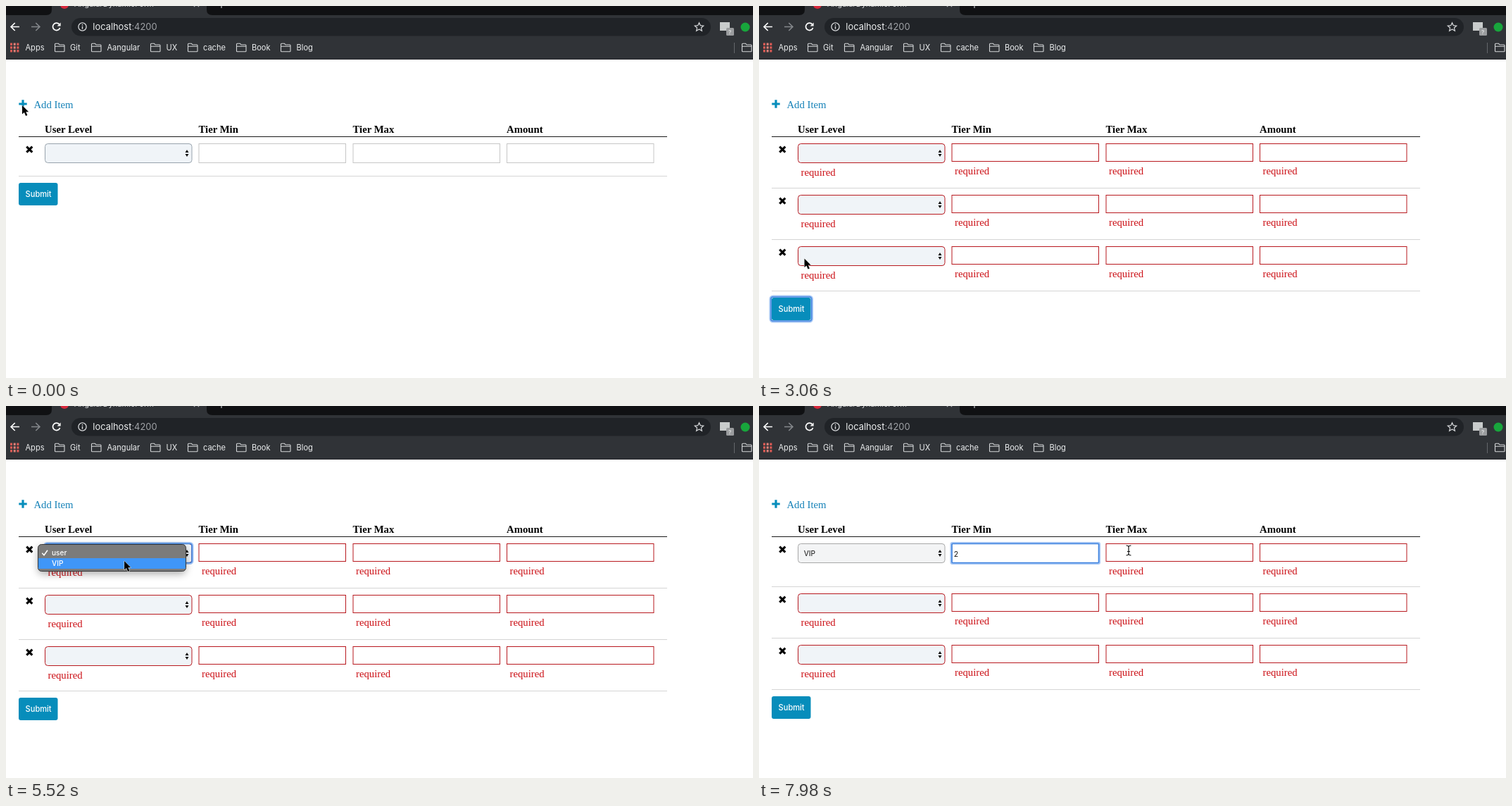
An HTML page for the animation above (8000 ms loop, 1061 px wide and 528 px high).

```html
<!DOCTYPE html>
<html lang="en">
<head>
<meta charset="utf-8">
<title>Dynamic form</title>
<style>
  html, body { margin: 0; width: 100%; height: 100%; overflow: hidden; background: #fff; }
  svg { display: block; width: 1061px; height: 528px; }
  text { white-space: pre; }
  .ui { font-family: Inter, "Liberation Sans", sans-serif; }
  .serif { font-family: "Liberation Serif", "Times New Roman", serif; font-size: 14.75px; }
  .bold { font-weight: 700; }
</style>
</head>
<body>
<svg viewBox="0 0 1061 528">
  <g id="browser"></g>
  <g id="page"></g>
  <g id="cursor"></g>
</svg>
<script>
const LOOP = 8000, STEP = 60;
const COLUMNS = [55, 273.5, 492.5, 711];
const LABELS = ['User Level', 'Tier Min', 'Tier Max', 'Amount'];
const FIELD_W = 209.5;
const TABLE_TOP = 185.5;
const RED = '#b8191f', BLUE = '#078dbb';

// Moments at which the form changes
const AT = {
  secondRow: 1260, thirdRow: 1920, press: 2700, submit: 2760,
  menu: 4320, hoverVip: 4980, choose: 5640, focusMin: 6060, type: 6900
};

// Pointer stops: time, x, y
const POINTER = [
  [0, 23, 141], [900, 24, 140], [2280, 25, 139], [2520, 44, 383], [2880, 45, 384],
  [3600, 170, 221], [4080, 172, 215], [4320, 175, 210], [4800, 175, 210],
  [5040, 170, 220], [5580, 168, 220], [5700, 277, 217], [5940, 345, 209],
  [7320, 345, 209], [7860, 525, 205], [8000, 525, 205]
];

const byId = id => document.getElementById(id);

function text(x, y, content, fill, cls, size, extra = '') {
  const fontSize = size ? `font-size="${size}"` : '';
  return `<text x="${x}" y="${y}" fill="${fill}" class="${cls}" ${fontSize} ${extra}>${content}</text>`;
}

function rect(x, y, w, h, fill, extra = '') {
  return `<rect x="${x}" y="${y}" width="${w}" height="${h}" fill="${fill}" ${extra}/>`;
}

function path(d, stroke, width, extra = '') {
  return `<path d="${d}" fill="none" stroke="${stroke}" stroke-width="${width}" ${extra}/>`;
}

function folder(x) {
  return path(`M${x + .5} 64V54.3q0-1 1-1h4l1.5 1.7h6q1 0 1 1V64q0 .8-.8 .8H${x + 1.3}q-.8 0-.8-.8zM${x + .5} 57.3h13.5`, '#d4d6d8', 1.1);
}

function browser() {
  const folders = [[69, 91, 'Git'], [121, 143.5, 'Aangular'], [205, 227.5, 'UX'],
    [258, 280, 'cache'], [327, 349, 'Book'], [390, 412.5, 'Blog']];
  let out = rect(0, 0, 1061, 76, '#303337') + rect(0, 0, 1061, 13, '#101113')
    + '<path d="M57 13q8 0 8-8V0H285V5q0 8 8 8z" fill="#303337"/>'
    + '<circle cx="83" cy="-2" r="6" fill="#d8283c"/>'
    + text(97, 1, 'AngularDynamicForm', '#dfe1e3', 'ui', 11.05)
    + path('M267-6l7 7M274-6l-7 7M306-6V3', '#aeb1b5', 1.3)
    + rect(93, 17, 908, 25.5, '#202327', 'rx="12.75"')
    + path('M19 29.5H7.5M12.7 24l-5.6 5.5 5.6 5.5', '#fff', 1.7)
    + path('M36 29.5H47.5M42.3 24l5.6 5.5-5.6 5.5', '#85888c', 1.6)
    + path('M75.7 26A5.2 5.2 0 1 0 76.6 31', '#fff', 1.7)
    + '<path d="M77.6 23.5v5h-5z" fill="#fff"/>'
    + '<circle cx="108.5" cy="29.5" r="5.6" fill="none" stroke="#d9dbdd" stroke-width="1.3"/>'
    + path('M108.5 28.7v4M108.5 26v1.5', '#d9dbdd', 1.4)
    + `<text x="123.3" y="34" class="ui" font-size="12.9" fill="#eceeef">localhost<tspan fill="#a0a3a7">:4200</tspan></text>`
    + path('M984.5 23.7l1.8 4 4.4.4-3.3 2.9 1 4.3-3.9-2.3-3.9 2.3 1-4.3-3.3-2.9 4.4-.4z', '#d4d6d8', 1.2)
    + rect(1014, 23, 14, 12, '#c9cccc')
    + rect(1023, 31, 11, 11, '#9a9c9e', 'rx="1.5"')
    + text(1026, 40, '?', '#fff', 'ui', 8)
    + '<circle cx="1050" cy="30" r="6.5" fill="#18a53c"/>';
  for (let i = 0; i < 9; i++)
    out += rect(6 + i % 3 * 4.7, 52.5 + Math.floor(i / 3) * 4.8, 3, 3.4, i % 3 === 1 ? '#df8078' : '#dc5b55');
  out += text(27.5, 63, 'Apps', '#eceeef', 'ui', 11.05);
  for (const [x, labelX, name] of folders)
    out += folder(x) + text(labelX, 63, name, '#eceeef', 'ui', 11.05);
  return out + path('M1034.5 52V67', '#64676b', 1) + folder(1045) + path('M0 75.5H1061', '#222428', 1);
}

function ring(x, y, w, h, radius = 3) {
  return rect(x - 1.2, y - 1.2, w + 2.4, h + 2.4, 'none', `rx="${radius + 1}" stroke="#a4c5f4" stroke-width="2.6"`)
    + rect(x, y, w, h, 'none', `rx="${radius}" stroke="#3f83df" stroke-width="1.6"`);
}

function selectBox(y, { value, invalid, focused }) {
  const x = COLUMNS[0] + .5, w = FIELD_W - 1, h = 27;
  const border = invalid ? RED : value ? '#a8a8a8' : '#98a3ad';
  return rect(x, y, w, h, value ? '#f3f4f5' : '#f0f4f8', `rx="4" stroke="${border}"`)
    + (focused ? ring(x, y, w, h, 3) : '')
    + `<path d="M254.5 ${y + 12.6}h5l-2.5-4zM254.5 ${y + 14.6}h5l-2.5 4z" fill="#111"/>`
    + (value ? text(63.7, y + 17.2, value, '#111', 'ui', 10.2) : '');
}

function inputBox(column, y, { value, invalid, focused, caret }) {
  const x = COLUMNS[column] + .5, w = FIELD_W - 1, h = invalid ? 25 : 27;
  return rect(x, y, w, h, '#fff', `stroke="${invalid ? RED : '#c6c6c6'}"`)
    + (focused ? ring(x, y, w, h, 1) : '')
    + (value ? text(x + 2.7, y + 18.4, value, '#111', 'ui', 10.4) : '')
    + (caret ? rect(x + (value ? 10 : 3.5), y + 7.5, 1, 13, '#111') : '');
}

function menu(hovered) {
  const item = (y, name) => text(65, y, name, '#fff', 'ui', 10.1, 'font-weight="500"');
  return '<rect x="46" y="200" width="209" height="38" rx="5" fill="#000" opacity=".35" style="filter:blur(6px)"/>'
    + rect(45.5, 196.5, 210, 38, '#7b7b7b', 'rx="5" stroke="#383838"')
    + rect(46, hovered ? 216 : 201, 209, 15, '#3f96f8')
    + path('M51.3 208.7l2.7 3 5-7', '#fff', 1.5)
    + item(212.3, 'user') + item(227, 'VIP');
}

function page(t) {
  const submitted = t >= AT.submit, chosen = t >= AT.choose, typed = t >= AT.type;
  const rowCount = 1 + (t >= AT.secondRow) + (t >= AT.thirdRow);
  const menuOpen = t >= AT.menu && !chosen;
  const minFocused = t >= AT.focusMin;
  const caret = minFocused && (t - AT.focusMin) % 1000 < 500;

  let out = path('M18.3 139H29.7M24 133.3V144.7', BLUE, 3.2)
    + text(39.4, 145, 'Add Item', '#1682b8', 'serif');
  LABELS.forEach((label, i) => out += text(COLUMNS[i], 180, label, '#000', 'serif bold'));
  out += path(`M18 ${TABLE_TOP}H939`, '#1a1a1a', 1);

  let top = TABLE_TOP;
  for (let row = 0; row < rowCount; row++) {
    const first = row === 0;
    const fieldY = Math.round(top) + 9.5;
    const selectInvalid = submitted && !(first && chosen);
    const y = fieldY - (Math.round(top) > top ? 1 : 0) + .5;
    const boxY = Math.floor(y) + .5;
    out += path(`M29.3 ${boxY + 4.2}l8 8m0-8l-8 8`, '#000', 3.1);
    out += selectBox(boxY, {
      value: first && chosen ? 'VIP' : '',
      invalid: selectInvalid,
      focused: first && t >= AT.menu && !minFocused
    });
    if (selectInvalid) out += text(59.5, boxY + 45.3, 'required', '#cc1117', 'serif');
    for (let column = 1; column < 4; column++) {
      const isMin = first && column === 1;
      const invalid = submitted && !(isMin && typed);
      out += inputBox(column, boxY, {
        value: isMin && typed ? '2' : '', invalid,
        focused: isMin && minFocused, caret: isMin && caret
      });
      if (invalid) out += text(COLUMNS[column] + 4.5, boxY + 43.3, 'required', '#cc1117', 'serif');
    }
    top += !submitted ? 56.3 : first && chosen ? 71 : 73;
    out += path(`M18 ${Math.floor(top) + .5}H939`, '#d5d5d5', 1);
  }

  const buttonY = Math.floor(top) + 10;
  out += rect(18, buttonY, 55.5, 32, BLUE, 'rx="3"')
    + text(27.6, buttonY + 20.3, 'Submit', '#fff', 'ui', 11.05, 'font-weight="500"');
  if (t >= AT.press && t < AT.menu) out += ring(17, buttonY - 1, 57.5, 34);
  return out + (menuOpen ? menu(t >= AT.hoverVip) : '');
}

function pointerAt(t) {
  const i = Math.max(1, POINTER.findIndex(stop => stop[0] > t));
  const [t0, x0, y0] = POINTER[i - 1], [t1, x1, y1] = POINTER[i];
  const u = (t - t0) / (t1 - t0), eased = u * u * (3 - 2 * u);
  return [x0 + (x1 - x0) * eased, y0 + (y1 - y0) * eased];
}

function cursor(t) {
  if (t >= AT.type && t < 7320) return '';
  const [x, y] = pointerAt(t);
  const beam = t > 5700 && (x > 274 && x < 483 || x > 493);
  const beamPath = 'M-3.5-7q3.5 0 3.5 2.5V4.5q0 2.5-3.5 2.5M3.5-7q-3.5 0-3.5 2.5V4.5q0 2.5 3.5 2.5M-2 1.5H2';
  const shape = beam
    ? path(beamPath, '#fff', 2.6) + path(beamPath, '#111', 1.2)
    : '<path d="M0 0V12.6L2.9 9.9 5.1 15 7.4 14 5.3 9.2H9.2Z" fill="#000" stroke="#fff" stroke-width="1" paint-order="stroke"/>';
  return `<g transform="translate(${x.toFixed(1)} ${y.toFixed(1)})">${shape}</g>`;
}

const shown = {};
function show(id, markup) {
  if (shown[id] !== markup) byId(id).innerHTML = shown[id] = markup;
}

function render(time) {
  const t = Math.floor(time % LOOP / STEP) * STEP;
  show('page', page(t));
  show('cursor', cursor(t));
}

show('browser', browser());
const start = performance.now();
function tick() {
  render(performance.now() - start);
  requestAnimationFrame(tick);
}
tick();
</script>
</body>
</html>
```
